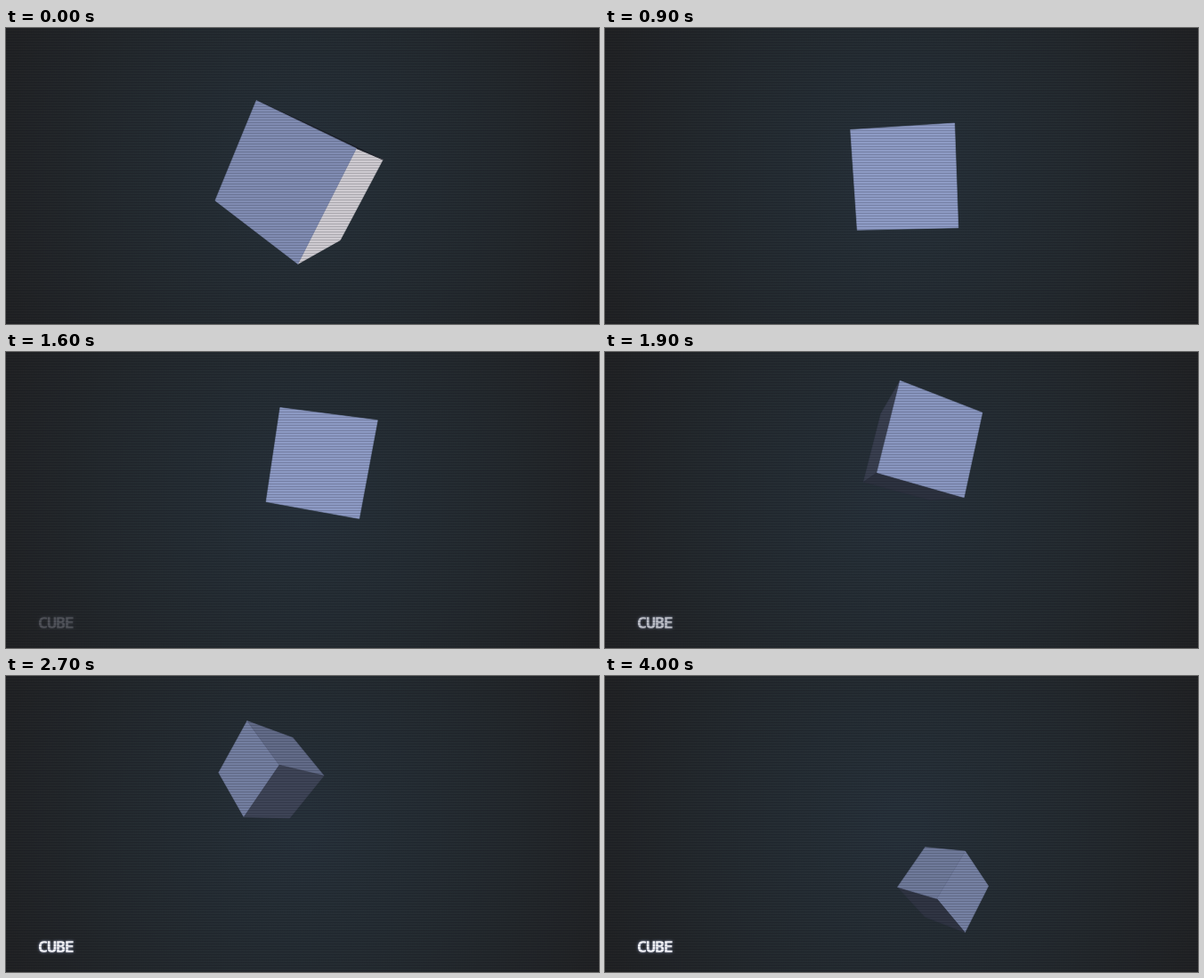
Recreate the animation shown at these times as an HTML page with a canvas. Size 666 px wide and 333 px high, loop 4100 ms.

```html
<!DOCTYPE html>
<html lang="en">
<head>
<meta charset="utf-8">
<title>Cube</title>
<style>
  html, body { margin: 0; width: 100%; height: 100%; overflow: hidden; background: #1f2325; }
  canvas { display: block; }
</style>
</head>
<body>
<canvas id="stage" width="666" height="333"></canvas>
<script>
const W = 666, H = 333, LOOP = 4100, STEP = 100, FOCAL = 300;
const ctx = document.getElementById('stage').getContext('2d');

// Key poses: centre in cube edges, turn about x, y, z in radians,
// and how white the two faces on the x axis are
const POSES = [
  { t: 0,    at: [.01, .03, 2.65],    turn: [.21, .43, .53],    white: 1 },
  { t: 600,  at: [-.02, .05, 2.9],    turn: [-.3, -.3, 0],      white: 0 },
  { t: 1200, at: [.18, -.15, 3.25],   turn: [.46, .51, .01],    white: 0 },
  { t: 1900, at: [.2, -.62, 3.34],    turn: [-.1, -.26, .26],   white: 0 },
  { t: 2700, at: [-.52, -.81, 4.33],  turn: [.84, -.87, 0],     white: 0 },
  { t: 3300, at: [.02, .01, 5.5],     turn: [0, -Math.PI / 2, 0], white: 1 },
  { t: 4000, at: [.79, 1.18, 5.03],   turn: [.79, -2.25, 0],    white: 0 }
];
const DARK = [29, 33, 41], BLUE = [142, 155, 197], WHITE = [206, 203, 209];

const dot = (a, b) => a[0] * b[0] + a[1] * b[1] + a[2] * b[2];
const add = (a, b, s) => a.map((v, i) => v + b[i] * s);
const clamp = (v, lo, hi) => Math.min(hi, Math.max(lo, v));
const mix = (a, b, f) => a.map((v, i) => v + (b[i] - v) * clamp(f, 0, 1));
const project = p => [W / 2 + FOCAL * p[0] / p[2], H / 2 + FOCAL * p[1] / p[2]];

function spline(a, b, c, d, u) {
  return b + u / 2 * (c - a + u * (2 * a - 5 * b + 4 * c - d + u * (3 * (b - c) + d - a)));
}

function poseAt(t) {
  const last = POSES.length - 1;
  let i = 0;
  while (i < last - 1 && t >= POSES[i + 1].t) i++;
  const near = [-1, 0, 1, 2].map(k => POSES[clamp(i + k, 0, last)]);
  const u = (t - near[1].t) / (near[2].t - near[1].t);
  const blend = get => spline(...near.map(get), u);
  return {
    at: [0, 1, 2].map(k => blend(p => p.at[k])),
    turn: [0, 1, 2].map(k => blend(p => p.turn[k])),
    white: blend(p => p.white)
  };
}

function rotate([x, y, z], [rx, ry, rz]) {
  const spin = (a, b, r) => [a * Math.cos(r) - b * Math.sin(r), a * Math.sin(r) + b * Math.cos(r)];
  [y, z] = spin(y, z, rx);
  [z, x] = spin(z, x, ry);
  [x, y] = spin(x, y, rz);
  return [x, y, z];
}

function drawCube(t) {
  const { at, turn, white } = poseAt(t);
  const axes = [[1, 0, 0], [0, 1, 0], [0, 0, 1]].map(axis => rotate(axis, turn));
  const lift = .4 * Math.cos(Math.PI * t / LOOP); // the lamp climbs from below to above
  ctx.save();
  ctx.filter = 'blur(0.6px)';
  axes.forEach((axis, i) => [1, -1].forEach(sign => {
    const normal = axis.map(v => v * sign), mid = add(at, normal, .5);
    if (dot(mid, normal) >= 0) return;
    const p = axes[(i + 1) % 3], q = axes[(i + 2) % 3];
    ctx.beginPath();
    for (const [a, b] of [[-.5, -.5], [.5, -.5], [.5, .5], [-.5, .5]])
      ctx.lineTo(...project(add(add(mid, p, a), q, b)));
    ctx.closePath();
    const lit = mix(DARK, BLUE, lift * normal[1] - normal[2]);
    ctx.fillStyle = ctx.strokeStyle = `rgb(${mix(lit, WHITE, i ? 0 : white).map(Math.round)})`;
    ctx.lineWidth = .6; // hides the seam between faces
    ctx.fill();
    ctx.stroke();
  }));
  ctx.restore();
}

function drawBackground() {
  const glow = ctx.createRadialGradient(W / 2, H / 2, 20, W / 2, H / 2, 370);
  glow.addColorStop(0, '#27313a');
  glow.addColorStop(.5, '#242b30');
  glow.addColorStop(1, '#212224');
  ctx.fillStyle = glow;
  ctx.fillRect(0, 0, W, H);
}

function drawLabel(t) {
  ctx.save();
  ctx.globalAlpha = clamp((t - 1500) / 600, 0, 1);
  ctx.font = '600 18.5px "Noto Sans Mono", monospace';
  ctx.letterSpacing = '-1.2px';
  ctx.fillStyle = '#f2f3f8';
  ctx.shadowColor = '#8d98b8';
  ctx.shadowBlur = 3;
  ctx.fillText('CUBE', 36, 311);
  ctx.restore();
}

function drawScanlines() {
  ctx.fillStyle = 'rgba(8,10,20,.18)';
  for (let y = 1; y < H; y += 3) ctx.fillRect(0, y, W, 1);
}

function frame(now) {
  const t = Math.floor(now % LOOP / STEP) * STEP;
  drawBackground();
  drawCube(t);
  drawLabel(t);
  drawScanlines();
  requestAnimationFrame(frame);
}
requestAnimationFrame(frame);
</script>
</body>
</html>
```
